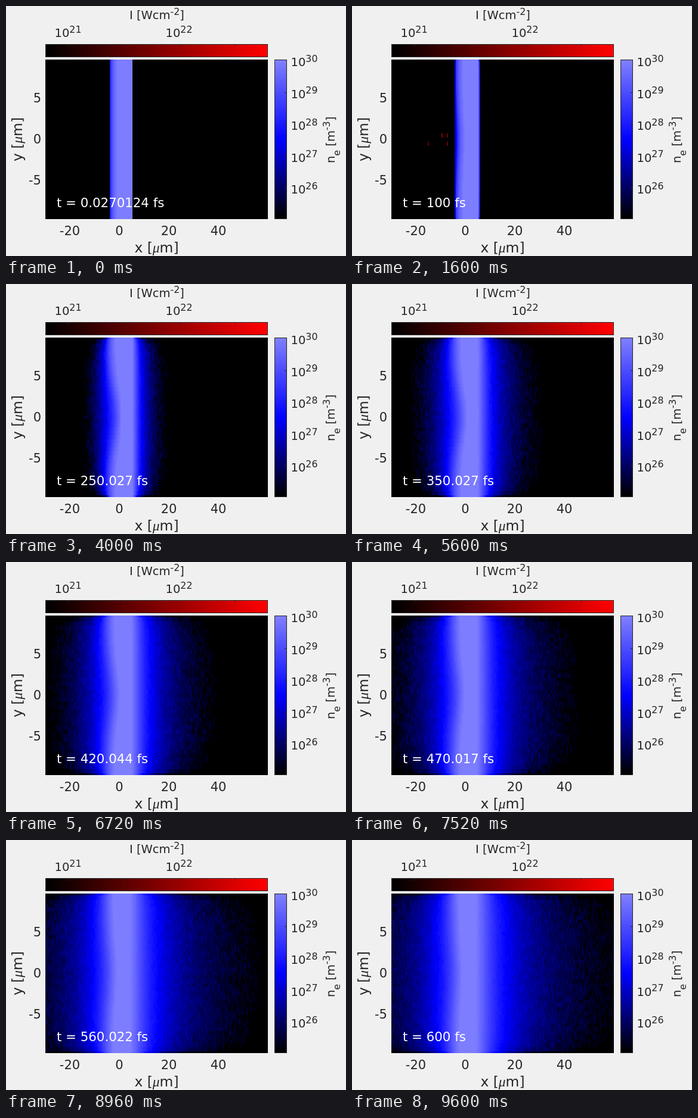
These frames come from a looping animation (570x420 px, 9760 ms). An HTML page with a canvas:

```html
<!DOCTYPE html>
<html lang="en">
<head>
<meta charset="utf-8">
<title>Electron density and laser intensity</title>
<style>
html, body { margin: 0; width: 570px; height: 420px; overflow: hidden; background: #f0f0f0; }
canvas, svg { position: absolute; left: 0; top: 0; }
text { font: 21px "DejaVu Sans", sans-serif; fill: #262626; white-space: pre; }
.small { font-size: 19.5px; }
.label { font-size: 23.4px; text-anchor: middle; }
.sup { font-size: 15.8px; }
.mu { font-family: "Liberation Serif", serif; font-style: italic; }
#time { font-size: 21.3px; fill: #fff; }
</style>
</head>
<body>
<canvas id="stage" width="570" height="420"></canvas>
<svg id="labels" width="570" height="420">
  <text class="small" x="207" y="22">I [Wcm<tspan class="sup" dy="-7">-2</tspan><tspan dy="7">]</tspan></text>
  <text class="label" x="252.5" y="414">x [<tspan class="mu">μ</tspan>m]</text>
  <text class="label" transform="translate(27 224) rotate(-90)">y [<tspan class="mu">μ</tspan>m]</text>
  <text class="small" transform="translate(551 264) rotate(-90)">n<tspan class="sup" dy="9">e</tspan><tspan dy="-9"> [m</tspan><tspan class="sup" dy="-8">-3</tspan><tspan dy="8">]</tspan></text>
  <text id="time" x="85" y="338"></text>
</svg>
<script>
const FRAMES = 61, STEP = 160, IMPACT = 8;
const LEFT = 66, TOP = 90, WIDTH = 373, HEIGHT = 268;
const CELL_W = 2, ROW_H = 6.7, MID_Y = 224;
const SLAB_LEFT = 174, SLAB_X = 193, SLAB_RIGHT = 212;
const DECADE = 53.6; // colour bar pixels per power of ten
const DT = 0.05402489; // simulation step in fs
const LEVELS = Array.from({ length: 11 }, (_, i) => i / 10);

const ctx = document.getElementById('stage').getContext('2d');
const labels = document.getElementById('labels');
const timeText = document.getElementById('time');

const clamp = (v, lo = 0, hi = 1) => Math.min(hi, Math.max(lo, v));
const mix = (a, b, k) => a + (b - a) * k;

function hash(a, b, c) {
  let h = Math.imul(a + 1, 374761393) ^ Math.imul(b + 1, 668265263) ^ Math.imul(c + 1, 1274126177);
  h = Math.imul(h ^ h >>> 15, 2246822519);
  h = Math.imul(h ^ h >>> 13, 3266489917);
  return ((h ^ h >>> 16) >>> 0) / 4294967296;
}

function blue(v) {
  const q = Math.round(clamp(v) * 63) / 63;
  const white = Math.round(clamp(2 * q - 1) * 125);
  return `rgb(${white},${white},${Math.round(clamp(2 * q) * 255)})`;
}

// How far a density level has spread from the slab; u is 0 at impact, 1 at the end
const reach = (level, u, range) =>
  range * Math.exp(-3.2 * level) * u ** (1.25 - .5 * level);

// Distances of all levels from the slab's middle, on both sides of one row
function contours(y, u) {
  const d = y - MID_Y, q = Math.abs(d) / 134;
  const dent = 99 * u * Math.exp(-3 * u) * Math.exp(-(d * d) / 4050);
  const pull = (.18 * q ** 4 + .3 * q ** 24) * clamp(3 * u);
  const narrow = level => 1 - pull * (1 - level);
  return {
    left: LEVELS.map(l => (SLAB_X - SLAB_LEFT + reach(l, u, 165) - 13 * l ** 6) * narrow(l)
      - dent * clamp(2 * l - .5)),
    right: LEVELS.map(l => (SLAB_RIGHT - SLAB_X + reach(l, u, 232) - 14 * u * l ** 6) * narrow(l))
  };
}

function density(distance, knots) {
  if (distance > knots[0]) return (knots[0] - distance) / 150;
  const i = knots.findIndex(k => distance > k);
  if (i < 0) return 1;
  return mix(LEVELS[i - 1], LEVELS[i], (knots[i - 1] - distance) / (knots[i - 1] - knots[i]));
}

function drawField(n) {
  ctx.fillStyle = '#000';
  ctx.fillRect(LEFT, TOP, WIDTH, HEIGHT);
  const u = Math.max(0, n - IMPACT) / (FRAMES - 1 - IMPACT);
  const noise = .14 * clamp(4 * u);
  for (let row = 0; row <= 40; row++) {
    const y = TOP + row * ROW_H;
    const y0 = Math.max(TOP, Math.round(y - ROW_H / 2));
    const y1 = Math.min(TOP + HEIGHT, Math.round(y + ROW_H / 2));
    const { left, right } = contours(y, u);
    for (let x = LEFT; x < LEFT + WIDTH; x += CELL_W) {
      const d = x + CELL_W / 2 - SLAB_X;
      let v = d < 0 ? density(-d, left) : density(d, right);
      v += noise * clamp(.75 - v, .03, .7) * (hash(x, row, n) + hash(row, x, n + 99) - 1);
      if (v <= .008) continue;
      ctx.fillStyle = blue(v);
      ctx.fillRect(x, y0, Math.min(CELL_W, LEFT + WIDTH - x), y1 - y0);
    }
  }
}

// Laser pulse: runs to the slab, then back out
function drawPulse(n) {
  if (n < 1 || n > 20) return;
  const back = n > 12.5;
  const centre = SLAB_LEFT - 12.5 * Math.abs(n - 12.5);
  for (const [offset, y] of [[-16, 214], [-7, 214], [-16, 228], [16, 228]]) {
    const x = Math.round(centre + (back ? offset : -offset));
    if (x < (back ? 77 : 109) || x > 171) continue;
    ctx.fillStyle = `rgb(${Math.round(160 - Math.abs(offset) * 3)},0,0)`;
    ctx.fillRect(x, y, 2, 7);
  }
}

function drawBars() {
  for (let i = 0; i < 64; i++) {
    ctx.fillStyle = `rgb(${Math.round(i / 63 * 255)},0,0)`;
    ctx.fillRect(LEFT + i * WIDTH / 64, 65, WIDTH / 64 + 1, 20);
    ctx.fillStyle = blue(i / 63);
    ctx.fillRect(450, 357 - (i + 1) * 266 / 64, 20, 266 / 64 + 1);
  }
  ctx.clearRect(439, 60, 5, 28);
  ctx.strokeStyle = ctx.fillStyle = '#262626';
  ctx.strokeRect(66.5, 64.5, 372, 21);
  ctx.strokeRect(450.5, 90.5, 20, 267);
  for (let i = 0; i < 4; i++) {
    ctx.fillRect(Math.round(104.5 + i * 93.3), 65, 1, 3);
    ctx.fillRect(467, Math.round(91 + (i + 1) * DECADE), 3, 1);
  }
}

function addText(x, y, html, attrs) {
  labels.insertAdjacentHTML('beforeend', `<text x="${x}" y="${y}" ${attrs}>${html}</text>`);
}
const power = (x, y, exp) =>
  addText(x, y, `10<tspan class="sup" dy="-7.5">${exp}</tspan>`, 'class="small"');

function addTicks() {
  for (let v = -20; v <= 40; v += 20) addText(190 + v * 4.15, 385, v, 'text-anchor="middle"');
  for (let v = -5; v <= 5; v += 5) addText(59, 231 - v * 13.8, v, 'text-anchor="end"');
  power(81.5, 52, 21);
  power(267.5, 52, 22);
  for (let i = 0; i < 5; i++) power(477.5, 101 + i * DECADE, 30 - i);
}

function clock(n) {
  const t = n === 0 ? DT / 2 : Math.min(600, Math.ceil(10 * n / DT) * DT);
  return `t = ${+t.toPrecision(6)} fs`;
}

let shown = -1;
function tick() {
  const n = Math.floor(performance.now() / STEP) % FRAMES;
  if (n !== shown) {
    shown = n;
    drawField(n);
    drawPulse(n);
    timeText.textContent = clock(n);
  }
  requestAnimationFrame(tick);
}

drawBars();
addTicks();
tick();
</script>
</body>
</html>
```
